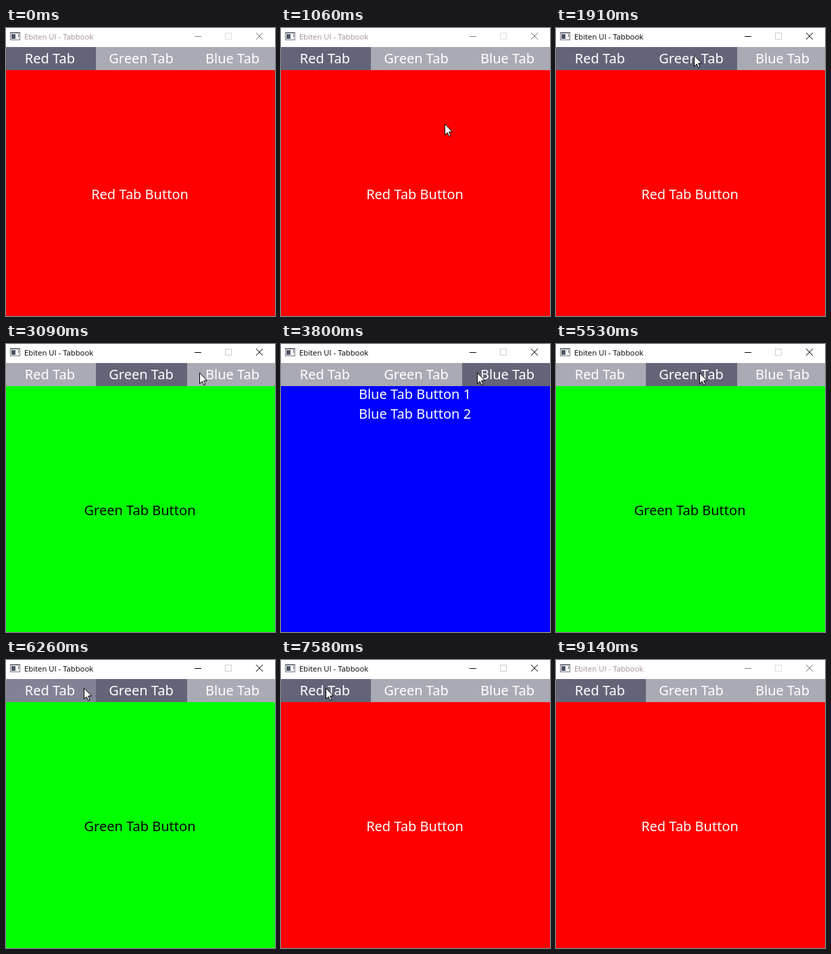
Animation of 398x424 px, one loop 9240 ms. Source, as an HTML page with a canvas:

```html
<!DOCTYPE html>
<html lang="en">
<head>
<meta charset="utf-8">
<title>Tabbook</title>
<style>
  html, body { margin: 0; width: 100%; height: 100%; overflow: hidden; background: #fff; }
  canvas { display: block; }
</style>
</head>
<body>
<canvas id="stage" width="398" height="424"></canvas>
<script>
const LOOP = 9240;
const ctx = document.getElementById('stage').getContext('2d');

const COLORS = { idle: '#aaaab4', hover: '#828296', pressed: '#646478' };

const red = { name: 'Red Tab', x: 0, width: 133, center: 65, fill: '#f00', ink: '#fff' };
const green = { name: 'Green Tab', x: 133, width: 135, center: 200, fill: '#0f0', ink: '#000' };
const blue = { name: 'Blue Tab', x: 268, width: 130, center: 335, fill: '#00f', ink: '#fff' };

// The pointer glides to each tab, hovers over it, then clicks it.
const ENTRY = { x: 342, y: 412 };
const VISITS = [
  { tab: green, start: 460, end: 1410, x: 204, y: 40, hover: 1390, press: 1770, release: 1960 },
  { tab: blue, start: 2470, end: 3160, x: 290, y: 42, hover: 3130, press: 3580, release: 3730 },
  { tab: green, start: 3800, end: 4630, x: 224, y: 42, hover: 4060, press: 5300, release: 5440 },
  { tab: red, start: 5450, end: 6810, x: 66, y: 41, hover: 6240, press: 7360, release: 7550 },
];
const EXIT = { start: 7940, end: 8720, x: 354, y: 424 };
const FOCUS = VISITS[0].press, BLUR = 9140;

const easeOut = k => 1 - (1 - k) ** 1.3;

function pointerAt(t) {
  if (t < VISITS[0].start || t >= EXIT.end) return null;
  let { x, y } = ENTRY;
  for (const move of [...VISITS, EXIT]) {
    if (t < move.start) break;
    const k = easeOut(Math.min(1, (t - move.start) / (move.end - move.start)));
    x += (move.x - x) * k;
    y += (move.y - y) * k;
  }
  return { x: Math.round(x), y: Math.round(y) };
}

function rect(color, x, y, w, h) {
  ctx.fillStyle = color;
  ctx.fillRect(x, y, w, h);
}

function text(str, x, y, color, font, align) {
  ctx.fillStyle = color;
  ctx.font = font;
  ctx.textAlign = align;
  ctx.fillText(str, x, y);
}

const label = (str, x, y, color) =>
  text(str, x, y, color, '20px "Noto Sans", sans-serif', 'center');

function drawTitleBar(active) {
  rect('#fff', 0, 0, 398, 28);

  rect('#777780', 6, 6, 15, 12);
  rect('#fff', 7, 8, 13, 9);
  rect('#4c5668', 8, 9, 6, 7);
  rect('#50505c', 18, 9, 1, 4);

  text('Ebiten UI - Tabbook', 27, 17, active ? '#000' : '#a58f96',
    '11.3px "Open Sans", sans-serif', 'left');

  rect(active ? '#000' : '#888', 279, 12, 10, 1);
  ctx.lineWidth = 1;
  ctx.strokeStyle = active ? '#ccc' : '#ddd';
  ctx.strokeRect(324.5, 7.5, 9, 9);
  ctx.strokeStyle = active ? '#000' : '#777';
  ctx.beginPath();
  ctx.moveTo(370, 7);
  ctx.lineTo(380, 17);
  ctx.moveTo(380, 7);
  ctx.lineTo(370, 17);
  ctx.stroke();
}

function drawTabs(open, hovered, pressed) {
  for (const tab of [red, green, blue]) {
    const look = tab === open || tab === pressed ? 'pressed' : tab === hovered ? 'hover' : 'idle';
    rect(COLORS[look], tab.x, 28, tab.width, 34);
    label(tab.name, tab.center, 52, '#fff');
  }
}

function drawPage(tab) {
  rect(tab.fill, 0, 62, 398, 362);
  const button = `${tab.name} Button`;
  if (tab === blue) {
    for (const n of [1, 2]) label(`${button} ${n}`, 198, 52 + 29 * n, tab.ink);
  } else {
    label(button, 198, 252, tab.ink);
  }
}

const arrow = new Path2D('M.5 .5V16.5L4.2 13L6.7 18.5L9 17.5L6.6 12H11.5Z');

function drawPointer({ x, y }) {
  ctx.save();
  ctx.translate(x, y);
  ctx.fillStyle = '#fff';
  ctx.strokeStyle = '#000';
  ctx.lineWidth = 1;
  ctx.fill(arrow);
  ctx.stroke(arrow);
  ctx.restore();
}

function draw(t) {
  const open = VISITS.findLast(v => t >= v.release)?.tab ?? red;
  const hovered = VISITS.findLast(v => t >= v.hover)?.tab;
  const pressed = VISITS.find(v => t >= v.press && t < v.release)?.tab;
  drawTitleBar(t >= FOCUS && t < BLUR);
  drawTabs(open, hovered, pressed);
  drawPage(open);
  const pointer = pointerAt(t);
  if (pointer) drawPointer(pointer);
}

const start = performance.now();
function frame() {
  draw((performance.now() - start) % LOOP);
  requestAnimationFrame(frame);
}
frame();
</script>
</body>
</html>
```
